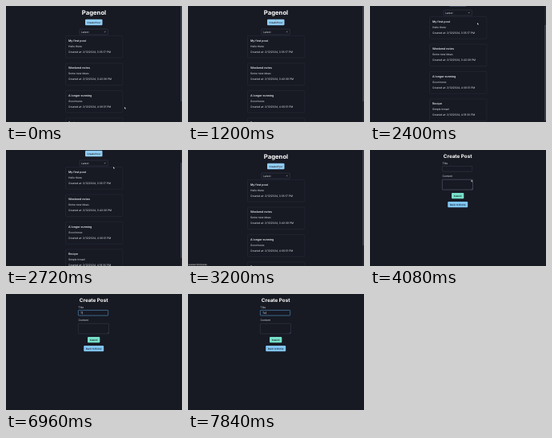
These frames come from a looping animation (220x146 px, 8000 ms). An HTML page:

```html
<!DOCTYPE html>
<html lang="en">
<head>
<meta charset="utf-8">
<title>Blog demo</title>
<style>
  html, body { margin: 0; width: 100%; height: 100%; overflow: hidden; background: #171923; }
  svg { display: block; width: 220px; height: 146px; }
  text { font-family: Inter, "Open Sans", sans-serif; fill: #e4e7ec; text-rendering: geometricPrecision; }
  .h { font-weight: 700; text-anchor: middle; fill: #fff; }
  .t { font-size: 3.6px; font-weight: 600; }
  .p { font-size: 3.3px; }
  .b { font-size: 2.9px; font-weight: 600; text-anchor: middle; fill: #1a202c; }
  .box { fill: none; stroke: #3a404d; stroke-width: .5; }
</style>
</head>
<body>
<svg viewBox="0 0 220 146">
  <rect width="220" height="146" fill="#171923"/>
  <g id="home">
    <g id="page">
      <text class="h" x="110" y="10.8" font-size="7.7">Pagenol</text>
      <rect x="99" y="16.8" width="21.5" height="7.4" rx="1" fill="#90cdf4"/>
      <text class="b" x="109.7" y="21.6">Create Post</text>
      <rect class="box" x="92" y="29" width="35.5" height="7" rx="1"/>
      <text class="p" x="94" y="33.7">Latest</text>
      <path d="M122.8 32l.9 .9 .9-.9" fill="none" stroke="#e4e7ec" stroke-width=".5"/>
      <g id="cards"></g>
    </g>
    <rect x="218" width="2" height="146" fill="#20232d"/>
    <rect id="thumb" x="218.4" width="1.2" height="120" fill="#4a4f5b"/>
  </g>
  <g id="form">
    <text class="h" x="109.7" y="9.6" font-size="6.3">Create Post</text>
    <text class="p" x="90.5" y="17.8">Title</text>
    <rect id="field" class="box" x="90.3" y="20.4" width="37.4" height="6.7" rx=".8"/>
    <text id="typed" class="p" x="93" y="25"></text>
    <rect id="caret" y="22" width=".4" height="3.4" fill="#e4e7ec"/>
    <text class="p" x="90.5" y="34">Content</text>
    <rect id="area" class="box" x="90.3" y="37.2" width="38.2" height="12.8" rx=".8"/>
    <path d="M127.2 49.4l.9-.9" stroke="#cbd0d8" stroke-width=".4"/>
    <rect x="102" y="54" width="15.3" height="7.3" rx="1" fill="#76e0c8"/>
    <text class="b" x="109.7" y="58.8">Submit</text>
    <rect x="97.2" y="65" width="25" height="7.2" rx="1" fill="#7fc4f2"/>
    <text class="b" x="109.7" y="69.7">Back to Home</text>
  </g>
  <g id="status">
    <rect y="143" width="24" height="3" fill="#2a2b31"/>
    <text id="link" x=".8" y="145.4" font-size="2.2"></text>
  </g>
  <path id="arrow" d="M0 0v2.6l.7-.6.5 1 .5-.2-.5-1h.8z" fill="#fff" stroke="#111" stroke-width=".2"/>
  <path id="beam" d="M-.6-1.7h1.2M0-1.7v3.4M-.6 1.7h1.2" fill="none" stroke="#fff" stroke-width=".4"/>
</svg>
<script>
  const LOOP = 8000, STEP = 80;
  const $ = id => document.getElementById(id);

  const posts = [
    ['My first post', 'Hello there', '3:35:17 PM'],
    ['Weekend notes', 'Some new ideas', '3:42:08 PM'],
    ['A longer evening', 'Good news', '4:06:51 PM'],
    ['Recipe', 'Simple bread', '4:18:30 PM'],
  ];
  $('cards').innerHTML = posts.map(([title, body, time], i) => {
    const y = 37.4 + i * 34.5;
    return `<rect class="box" x="74.5" y="${y}" width="71.5" height="27.8" rx="1" style="stroke:#2b303b"/>
      <text class="t" x="78" y="${y + 7.4}">${title}</text>
      <text class="p" x="78" y="${y + 14.4}">${body}</text>
      <text class="p" x="78" y="${y + 21.3}">Created at: 2/12/2024, ${time}</text>`;
  }).join('');

  // [ms, values...]
  const scroll = [[1920, 0], [2000, 12], [2080, 22], [2240, 24], [2560, 24], [2720, 16], [2880, 6], [2960, 0]];
  const pointer = [
    [0, 148, 127], [400, 134, 58], [480, 134, 58], [1360, 104, 9], [1400, 104, 9], [1680, 134, 21],
    [2800, 134, 21], [3200, 113, 20.5], [3760, 113, 20.5], [4080, 126.5, 37.5],
    [4640, 125.5, 55], [5040, 101, 25.6],
  ];

  function at(track, t) {
    const i = track.findIndex(k => k[0] > t);
    if (i === 0) return track[0].slice(1);
    if (i < 0) return track[track.length - 1].slice(1);
    const a = track[i - 1], b = track[i];
    const p = (t - a[0]) / (b[0] - a[0]);
    return a.slice(1).map((v, n) => v + (b[n + 1] - v) * p);
  }

  const between = (t, a, b) => t >= a && t < b;
  const show = (id, on) => { $(id).style.display = on ? '' : 'none'; };

  function draw(now) {
    const t = Math.floor(now % LOOP / STEP) * STEP;
    const onForm = t >= 3600;
    const [top] = at(scroll, t);
    const [x, y] = at(pointer, t);
    const focus = t >= 5040, typing = t >= 6960;

    show('home', !onForm);
    show('form', onForm);
    $('page').setAttribute('transform', `translate(0 ${-top})`);
    $('thumb').setAttribute('y', top);

    $('field').style.stroke = focus ? '#63b3ed' : '';
    $('area').style.stroke = between(t, 4080, 4560) ? '#697080' : '';
    const word = t >= 7280 ? 'Te' : typing ? 'T' : '';
    $('typed').textContent = word;
    $('caret').setAttribute('x', 93.2 + word.length * 1.9);
    show('caret', typing && !between(t, 7680, 7840));

    const overCard = between(t, 240, 640);
    show('status', overCard || between(t, 3120, 3920));
    $('link').textContent = overCard ? 'localhost:3000/post/4' : 'localhost:3000/create';

    show('arrow', !focus);
    show('beam', focus && !typing);
    for (const id of ['arrow', 'beam']) $(id).setAttribute('transform', `translate(${x} ${y})`);
  }

  const start = performance.now();
  function tick() {
    draw(performance.now() - start);
    requestAnimationFrame(tick);
  }
  tick();
</script>
</body>
</html>
```
